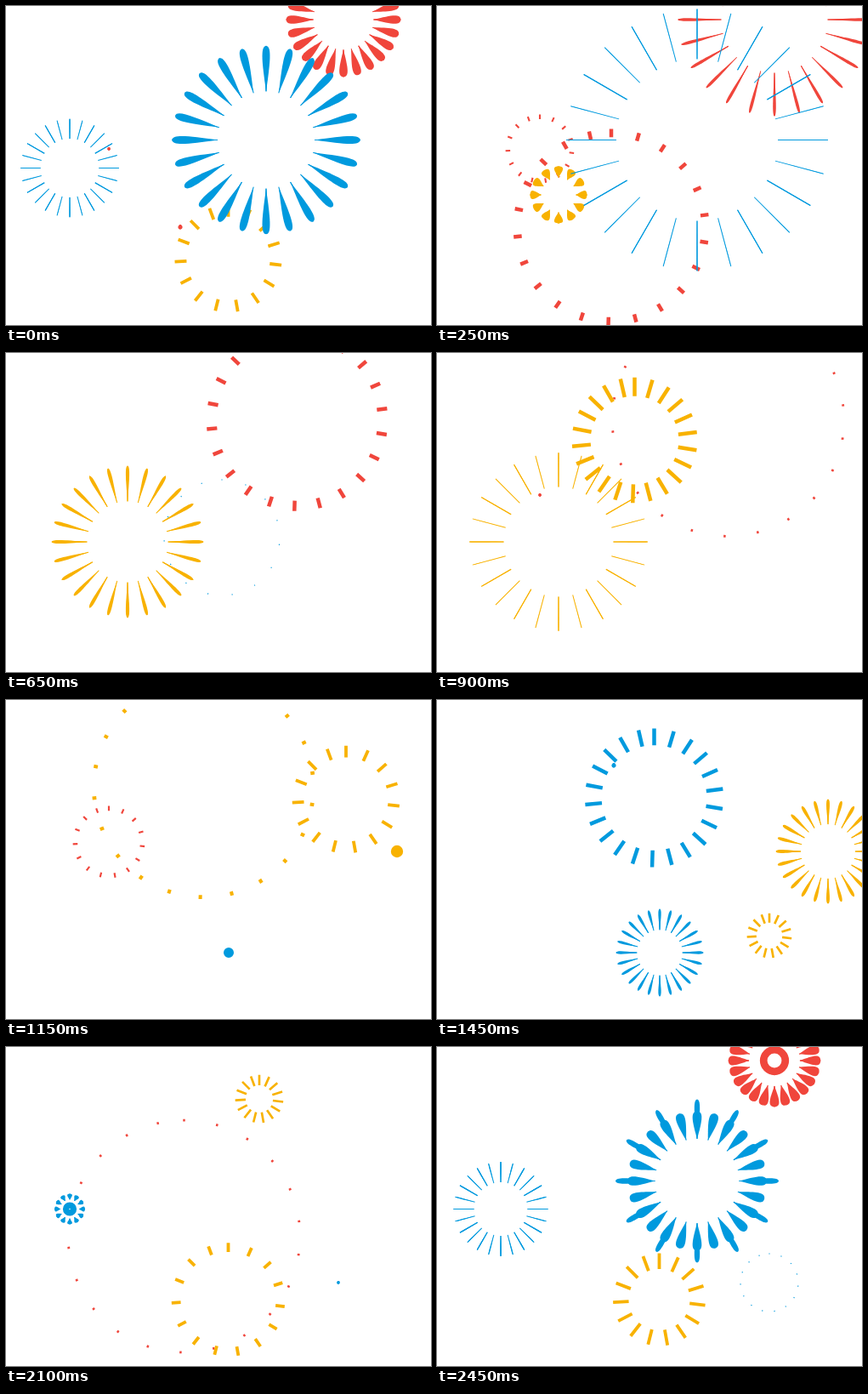
An HTML page with a canvas for the animation above (2500 ms loop, 500x375 px).

```html
<!DOCTYPE html>
<html lang="en">
<head>
<meta charset="utf-8">
<title>Fireworks</title>
<style>
  html, body { margin: 0; width: 100%; height: 100%; overflow: hidden; background: #fff; }
  canvas { display: block; }
</style>
</head>
<body>
<canvas id="stage" width="500" height="375"></canvas>
<script>
const ctx = document.getElementById('stage').getContext('2d');
const LOOP = 2500, STEP = 50, TAU = Math.PI * 2;
const BLUE = '#009ade', RED = '#f0463c', YELLOW = '#f8b200';

// Rings of dashes: x, y, final radius, start time, colour
const rings = [
  [205, 260, 138, 0, RED],
  [342.5, 79, 138, 438, RED],
  [232.5, 102.5, 138, 790, YELLOW],
  [255.5, 115, 138, 1320, BLUE],
  [208, 77, 138, 1450, BLUE],
  [209.5, 222.5, 138, 1636, RED],
  [121, 168, 39, 0, RED],
  [254, 217, 68, 300, BLUE],
  [121, 167, 41, 900, RED],
  [400, 117, 68, 985, YELLOW],
  [391, 277, 34, 1350, YELLOW],
  [386, 147, 34, 1667, RED],
  [443, 54, 43, 1700, RED],
  [261.5, 297, 68, 1900, YELLOW],
  [298, 61, 34, 1990, YELLOW],
  [391, 277, 34, 2100, BLUE],
  [261.5, 297, 68, 2337, YELLOW]
];

// Flowers of petals: x, y, final radius, start time, colour, duration, has core, lag of every second petal
const flowers = [
  [143, 222, 107, 88, YELLOW, 950, false, 1.2],
  [262, 297, 67, 1131, BLUE, 620, true, 1.2],
  [460, 178, 80, 1131, YELLOW, 620, true, 1.2],
  [75, 190.5, 60, 2000, BLUE, 620, true, 1.2],
  [397, 16, 127, 2280, RED, 700, true, 0],
  [306, 157.5, 157, 2217, BLUE, 620, true, 1.2]
];

const age = (time, start) => (time - start + LOOP) % LOOP;

function drawRing(time, [x, y, size, start, color]) {
  const big = size > 100;
  const u = age(time, start) / (big ? 600 : 370);
  if (u >= 1) return;
  const left = 1 - u;
  const radius = size * (1 - left ** 3);
  const fade = big
    ? 36 * left ** 3 + 2.4 * Math.min(1, left * 5)
    : (0.2 * size + 16) * left ** 1.3;
  const length = Math.max(1.2, Math.min(fade, Math.max(3, radius ** 1.5 / 8.5)));
  const width = Math.min(4.5, 1.5 + 0.034 * size) * Math.min(1, 2 * left + 0.1);
  // The spacing does not divide the circle, so a narrow gap stays at the top left
  const count = big ? 22 : 15, spacing = (big ? 16.52 : 24.25) * Math.PI / 180;

  ctx.strokeStyle = color;
  ctx.lineWidth = Math.max(1.2, width);
  ctx.beginPath();
  for (let i = 0; i < count; i++) {
    const dx = Math.sin(i * spacing), dy = -Math.cos(i * spacing);
    const from = radius - length / 2, to = radius + length / 2;
    ctx.moveTo(x + dx * from, y + dy * from);
    ctx.lineTo(x + dx * to, y + dy * to);
  }
  ctx.stroke();
}

// A drop with a sharp inner end, widest near the outside, on a thin spine
function drawPetal(inner, outer, width) {
  if (outer - width / 2 <= inner) return;
  const r = width / 2, shoulder = inner + (outer - inner) * 0.6;
  ctx.beginPath();
  ctx.moveTo(inner, 0);
  ctx.bezierCurveTo(shoulder, -r, outer, -1.6 * r, outer, 0);
  ctx.bezierCurveTo(outer, 1.6 * r, shoulder, r, inner, 0);
  ctx.fill();
  ctx.beginPath();
  ctx.moveTo(inner, 0);
  ctx.lineTo(outer, 0);
  ctx.stroke();
}

function drawFlower(time, [x, y, size, start, color, duration, core, lag]) {
  const u = age(time, start) / duration;
  if (u >= 0.88) return;
  const inner = size * (0.09 + 0.6 * u);
  const outer = size * (1 - (1 - u) ** 2);
  const late = outer - size * lag * Math.max(0, 0.45 - u);
  const body = outer - size * lag * Math.max(0, Math.min(u - 0.2, 0.45 - u));
  const width = size * 0.12 * (1 - u / 0.88);

  ctx.save();
  ctx.translate(x, y);
  ctx.fillStyle = ctx.strokeStyle = color;
  ctx.lineWidth = 1;
  if (core && u < 0.29) {
    const radius = size * Math.min(0.135, 0.05 + 1.3 * u);
    ctx.beginPath();
    ctx.arc(0, 0, radius, 0, TAU);
    ctx.arc(0, 0, radius * (u / 0.29) ** 4, 0, TAU, true);
    ctx.fill('evenodd');
  }
  for (let i = 0; i < 24; i++) {
    if (i % 2) {
      drawPetal(inner, late, width);
    } else {
      drawPetal(inner, body, width);
      drawPetal(inner, outer, width * 0.6);
    }
    ctx.rotate(TAU / 24);
  }
  ctx.restore();
}

function frame() {
  const time = Math.floor(performance.now() % LOOP / STEP) * STEP;
  ctx.clearRect(0, 0, 500, 375);
  rings.forEach(ring => drawRing(time, ring));
  flowers.forEach(flower => drawFlower(time, flower));
  requestAnimationFrame(frame);
}
frame();
</script>
</body>
</html>
```
